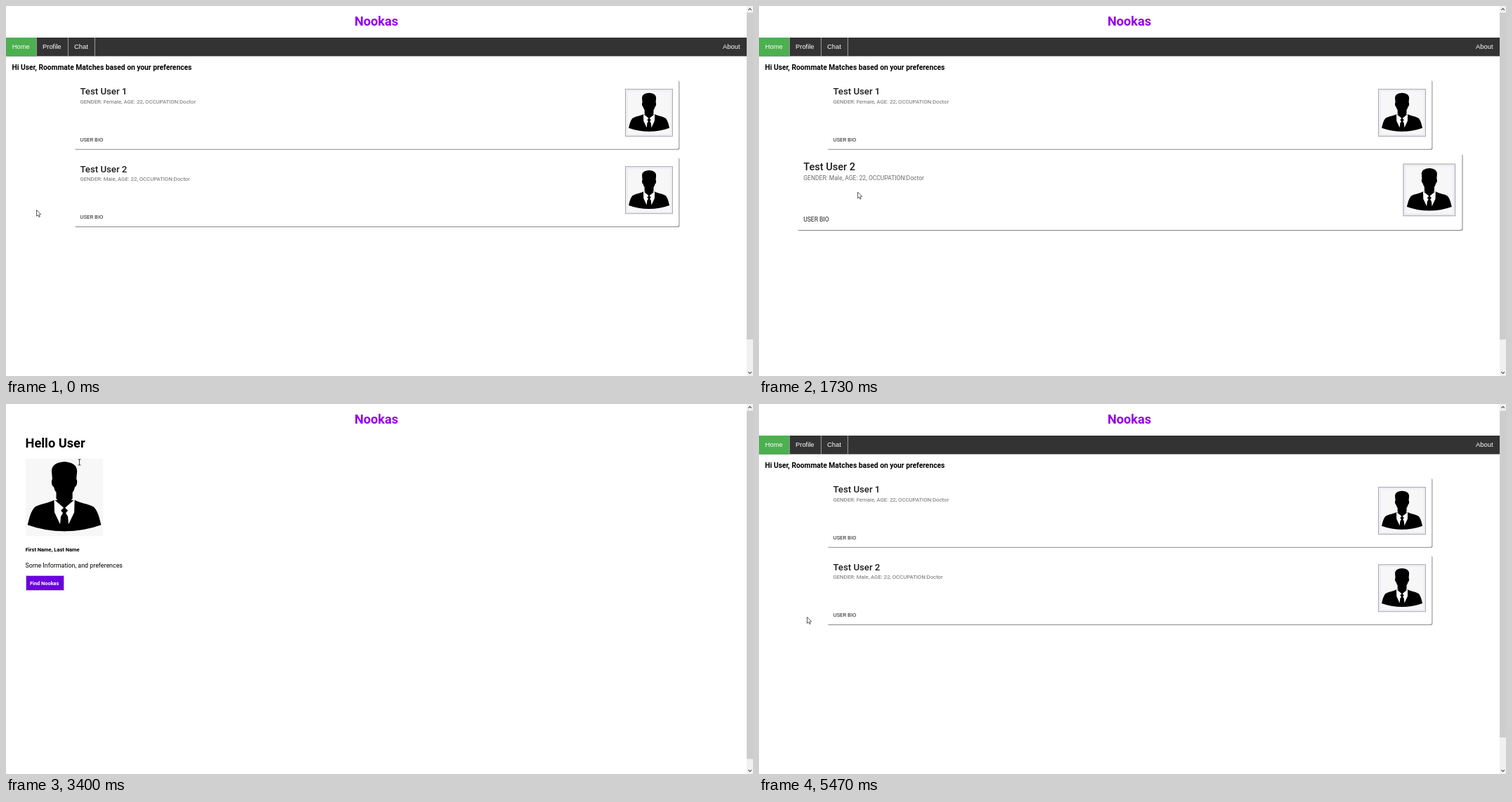
Animation, 1063 px wide and 527 px high, one loop 6.07 s. Source, as an HTML page:

```html
<!DOCTYPE html>
<html lang="en">
<head>
<meta charset="utf-8">
<title>Roommate matches</title>
<style>
  html, body { margin: 0; height: 100%; overflow: hidden; background: #fff; }
  svg { display: block; }
  text { font-family: Roboto, sans-serif; }
  .h1 { font-size: 18.2px; font-weight: 700; }
  .nav text { font: 9.4px "Liberation Sans", Arial, sans-serif; fill: #fff; }
  .panel { fill: #fff; filter: drop-shadow(1.5px 1.5px .5px #888); }
  .name { font-size: 13.2px; font-weight: 500; fill: #1c1c1c; }
  .info { font-size: 7.75px; fill: #6c6c6c; }
  .bio { font-size: 7.75px; fill: #1c1c1c; }
</style>
</head>
<body>
<svg width="1063" height="527" viewBox="0 0 1063 527">
  <defs>
    <symbol id="avatar" viewBox="0 0 110 110">
      <path fill="#f7f7f7" d="M0 0h110v110H0z"/>
      <g id="half">
        <path d="M40 59C30 64 16 65 12 70C7 76 5 86 3 94Q28 103 55.5 103V59Z"/>
        <path fill="#fff" d="M40.5 58L54 69.5L50 73.5L53 77L50 82L49 93L41 76Z"/>
        <path d="M55.5 4.5C46 5 37 8 37 18L38 29C36 31 37 39 40 40Q41 45 43.5 48V57L55.5 69Z"/>
      </g>
      <use href="#half" transform="matrix(-1 0 0 1 110 0)"/>
    </symbol>
  </defs>

  <text class="h1" x="527" y="28.3" text-anchor="middle" fill="#9500e8">Nookas</text>

  <g id="home">
    <g class="nav">
      <path fill="#333" d="M0 45h1054v26.4H0z"/>
      <path fill="#4caf50" d="M0 45h43v26.4H0z"/>
      <path id="hover" fill="#ddd" d="M43 45h45v26.4h-45z"/>
      <path stroke="#bbb" stroke-width=".8" d="M43.4 45v26.4M88.4 45v26.4M126.4 45v26.4"/>
      <text x="8.8" y="61">Home</text>
      <text id="profileLink" x="52" y="61">Profile</text>
      <text x="97" y="61">Chat</text>
      <text x="1020" y="61">About</text>
    </g>
    <text x="8.4" y="90.8" font-size="10.25" font-weight="700">Hi User, Roommate Matches based on your preferences</text>
    <g id="cards"></g>
  </g>

  <g id="profile">
    <text class="h1" x="27.6" y="61.6">Hello User</text>
    <use href="#avatar" x="27.7" y="77.7" width="110.7" height="110.7"/>
    <text x="27.7" y="210.2" font-size="7.5" font-weight="700">First Name, Last Name</text>
    <text x="27.4" y="232.8" font-size="8.87">Some Information, and preferences</text>
    <rect id="button" x="28.5" y="244.5" width="54" height="21" fill="#6a00e0"/>
    <text x="33.9" y="257.8" font-size="7.4" font-weight="700" fill="#fff">Find Nookas</text>
  </g>

  <path fill="#f0f0f0" d="M1054 0h9v527h-9z"/>
  <rect id="thumb" x="1054" y="9.5" width="9" fill="#cdcdcd"/>
  <path fill="none" stroke="#505050" stroke-width="1.1" d="M1056.3 5.8l2.3-2.3l2.3 2.3M1056.3 521.2l2.3 2.3l2.3-2.3"/>

  <g id="status">
    <path fill="#333" d="M0 515.5h68V527H0z"/>
    <text x="2" y="523.8" fill="#fff" style="font:6.25px 'Noto Sans',sans-serif">localhost:4200/profile</text>
  </g>

  <g id="cursor">
    <path id="arrow" fill="#fff" stroke="#333" stroke-width=".8" d="M.5 .5V9.4L2.5 7.6L3.9 10.6L5.3 10L4 7.1L6.6 6.8Z"/>
    <path id="beam" fill="none" stroke="#222" stroke-width=".9" d="M-2 -4H2M0 -4V4M-2 4H2"/>
  </g>
</svg>
<script>
const LOOP = 6070, STEP = 200 / 3;
const $ = id => document.getElementById(id);
const show = (id, on) => $(id).setAttribute('display', on ? 'inline' : 'none');
const progress = (t, start, end) => Math.min(1, Math.max(0, (t - start) / (end - start)));
const easeOut = k => 1 - (1 - k) ** 2;

// Each move glides on from wherever the pointer rests.
const home = { x: 43, y: 290 };
const moves = [
  { start: 67, end: 670, x: 145, y: 186 },      // onto the first card
  { start: 930, end: 1133, x: 151, y: 239 },    // down to the second
  { start: 1133, end: 1467, x: 142, y: 266 },
  { start: 1730, end: 2067, x: 37, y: 190 },    // out to the left
  { start: 2067, end: 2333, x: 42, y: 82 },
  { start: 2400, end: 2933, x: 60.5, y: 63 },   // profile link
  { start: 3340, end: 4000, x: 314, y: 178 },
  { start: 4050, end: 4133, x: 313, y: 196.5 },
  { start: 4333, end: 4800, x: 52, y: 255 },    // button
  { start: 5220, end: 5467, x: 68, y: 303 }
];

const cards = [
  { y: 105, name: 'Test User 1', gender: 'Female', enter: 350, leave: 1097 },
  { y: 215.2, name: 'Test User 2', gender: 'Male', enter: 1113, leave: 1990 }
];

$('cards').innerHTML = cards.map(({ y, name, gender }) => `<g>
  <rect class="panel" x="96.6" y="${y}" width="860.8" height="98.8" rx="2.2"/>
  <text class="name" x="105.4" y="${y + 21.3}">${name}</text>
  <text class="info" x="105.4" y="${y + 34}">GENDER: ${gender}, AGE: 22, OCCUPATION:Doctor</text>
  <text class="bio" x="105.4" y="${y + 87.8}">USER BIO</text>
  <rect x="881.5" y="${y + 13.5}" width="67" height="67" fill="#ededf2" stroke="#a9a9b2"/>
  <use href="#avatar" x="884.4" y="${y + 16.3}" width="61.4" height="61.4"/>
</g>`).join('');
const cardNodes = [...$('cards').children];

// CSS "ease": cubic-bezier(.25, .1, .25, 1), solved by bisection
function ease(x) {
  const curve = (u, a, b) => 3 * (1 - u) ** 2 * u * a + 3 * (1 - u) * u * u * b + u ** 3;
  let low = 0, high = 1;
  for (let i = 0; i < 16; i++) {
    const mid = (low + high) / 2;
    if (curve(mid, .25, .25) < x) low = mid; else high = mid;
  }
  return curve(low, .1, 1);
}

function pointerAt(t) {
  let { x, y } = home;
  for (const move of moves) {
    const k = easeOut(progress(t, move.start, move.end));
    x += (move.x - x) * k;
    y += (move.y - y) * k;
  }
  return [x, y];
}

function draw(t) {
  const within = (from, to) => t > from && t < to;
  const onProfile = within(2990, 5125), hovering = within(2500, 2990);
  show('home', !onProfile);
  show('profile', onProfile);
  show('hover', hovering);
  $('profileLink').style.fill = hovering ? '#000' : '#fff';
  $('thumb').setAttribute('height', onProfile ? 496 : 465.5);
  $('button').setAttribute('stroke', within(4990, 5125) ? '#8a80a0' : '#c9bfd6');

  show('status', within(2500, 3125));
  $('status').setAttribute('opacity', t > 3060 ? .5 : 1);

  cards.forEach(({ y, enter, leave }, i) => {
    const hoverAmount = ease(progress(t, enter, enter + 300)) - ease(progress(t, leave, leave + 300));
    const cy = y + 49.5;
    cardNodes[i].setAttribute('transform',
      `translate(527 ${cy}) scale(${1 + .1 * hoverAmount}) translate(-527 ${-cy})`);
  });

  const overText = within(1110, 1190) || within(2590, 3410);
  show('beam', overText);
  show('arrow', !overText);
  $('cursor').setAttribute('transform', `translate(${pointerAt(t)})`);
}

// The picture advances at 15 steps per second.
function tick() {
  const t = performance.now() % LOOP;
  draw(Math.floor((t + 4) / STEP) * STEP);
  requestAnimationFrame(tick);
}
tick();
</script>
</body>
</html>
```
